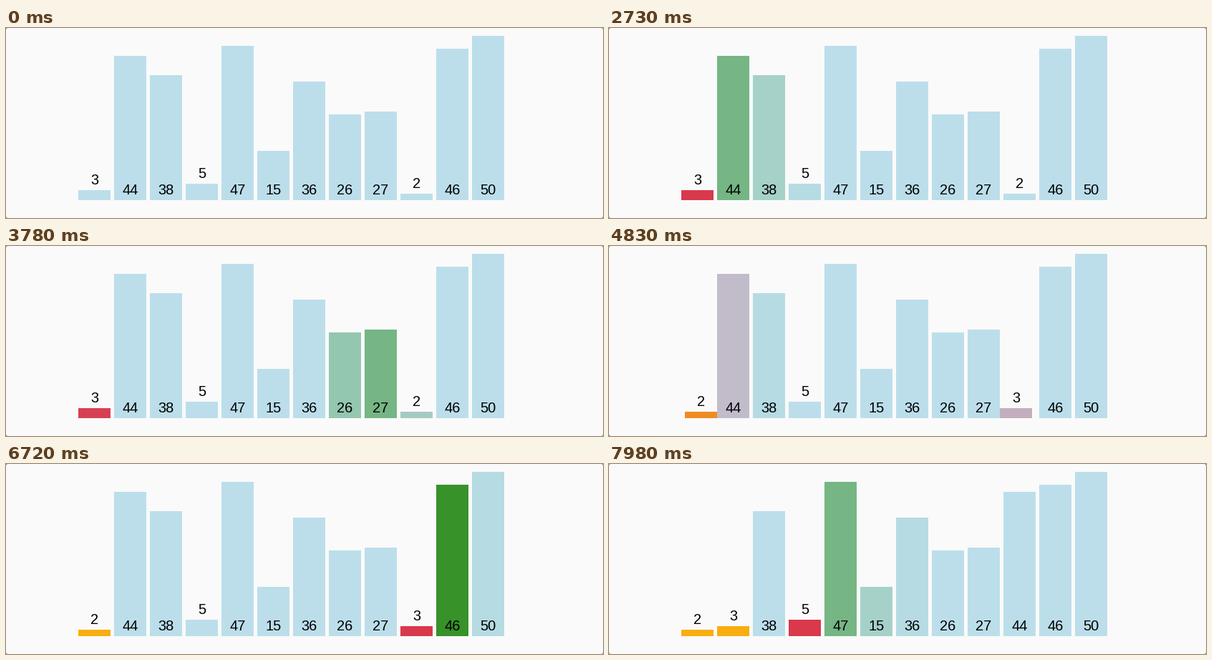
Recreate the animation shown at these times as a matplotlib script. Size 834 by 266 pixels, loop 8 s.

```python
import numpy as np
import matplotlib.pyplot as plt
from matplotlib.animation import FuncAnimation
from matplotlib.patches import FancyBboxPatch, Rectangle

W, H, DPI = 834, 266, 100
LOOP, TICK, HOLD = 8000, 20, 70
VALUES = [3, 44, 38, 5, 47, 15, 36, 26, 27, 2, 46, 50]
N = len(VALUES)
LEFT, PITCH, BAR_W, BASE, UNIT = 101, 50, 45, 241, 4.6

BLUE, GREEN, RED, ORANGE = np.array(
    [(188, 222, 235), (48, 143, 32), (216, 57, 76), (248, 174, 16)]) / 255

# Rhythm of the sort: seven steps per beat, as (offset, duration) in ms
FIRST, BEAT = 2730, 1050
RHYTHM = [(-100, 465), (130, 300), (340, 460), (340, 300),
          (620, 230), (700, 636), (850, 570)]
SWAP_MS = 500


def selection_steps(passes=3):
    """List of (colours, slots or None); slots are given only for swaps."""
    order, done, steps = list(range(N)), [], []

    def add(marks, slots=None):
        colors = np.tile(BLUE, (N, 1))
        colors[done] = ORANGE
        for bar, color in marks.items():
            colors[bar] = color
        steps.append((colors, slots))

    for i in range(passes):
        low = i
        add({order[low]: RED})
        for j in range(i + 1, N):
            add({order[low]: RED, order[j]: GREEN})
            if VALUES[order[j]] < VALUES[order[low]]:
                low = j
                add({order[low]: RED})
        pair = {order[i]: RED, order[low]: RED}
        add(pair)
        order[i], order[low] = order[low], order[i]
        add(pair, np.argsort(order).astype(float))
        done.append(order[i])
        add({})
    return steps


def ease(p):
    p = min(max(p, 0), 1)
    return 4 * p ** 3 if p < 0.5 else 1 - 4 * (1 - p) ** 3


STEPS = selection_steps()


def pose(t):
    """Colours and slots of all bars; later steps blend over earlier ones."""
    colors, slots = np.tile(BLUE, (N, 1)), np.arange(N, dtype=float)
    for k, (goal, places) in enumerate(STEPS):
        beat, r = divmod(k - 3, len(RHYTHM))
        offset, span = RHYTHM[r]
        age = t - FIRST - beat * BEAT - offset
        e = ease(age / span)
        colors += (goal - colors) * e
        if places is not None:
            slots += (places - slots) * ease(age / SWAP_MS)
    return colors, slots


fig = plt.figure(figsize=(W / DPI, H / DPI), dpi=DPI, facecolor="#8c8c8c")
ax = fig.add_axes([0, 0, 1, 1])
ax.set_xlim(0, W)
ax.set_ylim(H, 0)
ax.axis("off")
ax.add_patch(FancyBboxPatch((0, 0), W, H, fc="#fafafa", ec="none",
                            boxstyle="round,pad=0,rounding_size=3"))

bars, labels = [], []
for v in VALUES:
    top = BASE - v * UNIT
    bars.append(ax.add_patch(Rectangle((0, top), BAR_W, v * UNIT, lw=0)))
    y = top - 8 if v < 10 else BASE - 8
    labels.append(ax.text(0, y, str(v), ha="center", va="baseline",
                          family="Liberation Sans", color="black",
                          fontsize=20 * 72 / DPI))


def draw(i):
    t = (i * TICK + TICK // 2) // HOLD * HOLD
    for bar, label, color, slot in zip(bars, labels, *pose(t)):
        x = LEFT + slot * PITCH
        bar.set_x(x)
        bar.set_facecolor(np.clip(color, 0, 1))
        label.set_x(x + BAR_W / 2)
    return bars + labels


anim = FuncAnimation(fig, draw, frames=LOOP // TICK, interval=TICK,
                     init_func=lambda: draw(0), repeat=True, repeat_delay=0)
plt.show()
```
